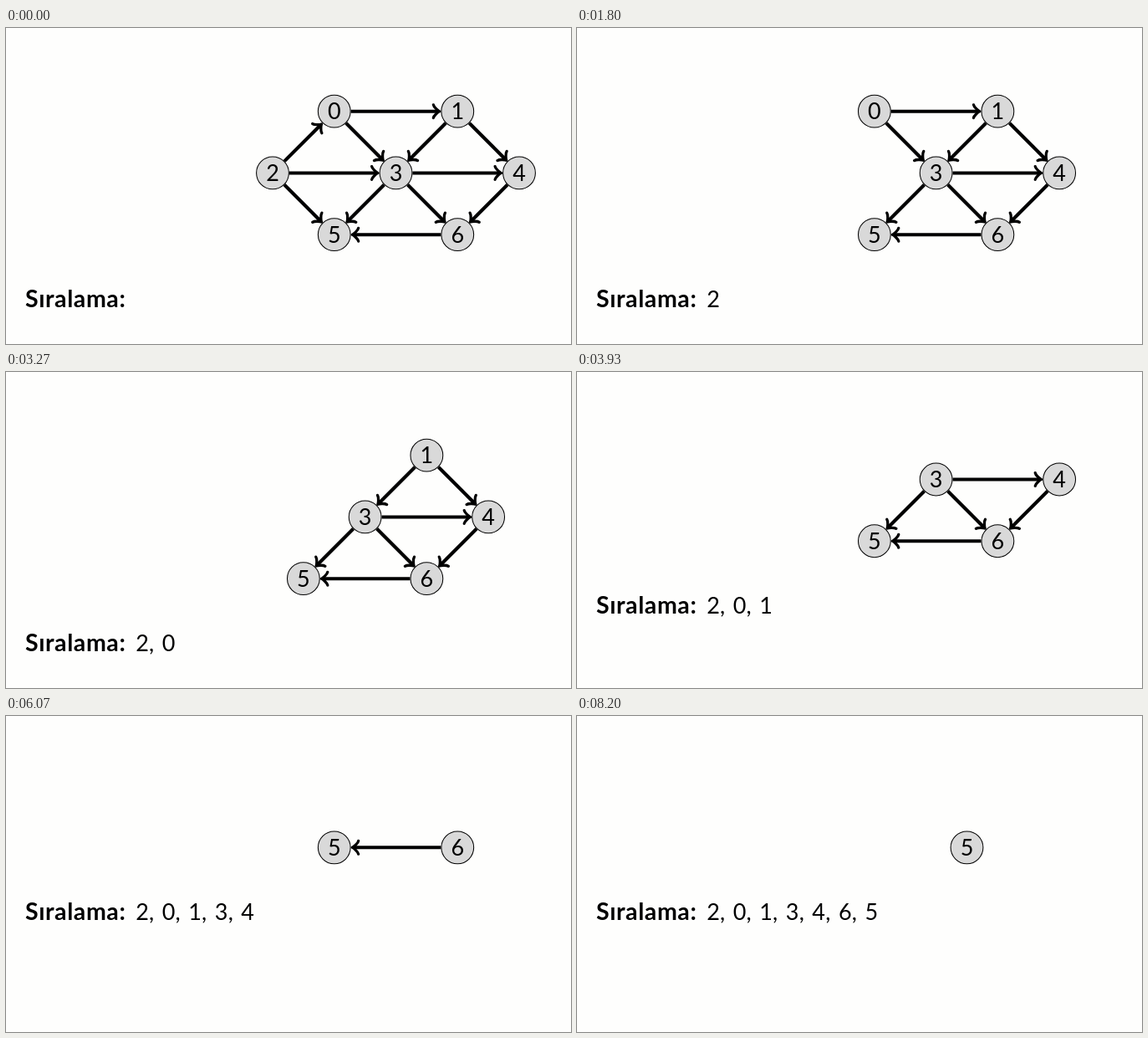
These frames come from a looping animation (676 by 378 pixels, 9760 ms). An HTML page:

```html
<!DOCTYPE html>
<html lang="tr">
<head>
<meta charset="utf-8">
<title>Sıralama</title>
<style>
  html, body { margin: 0; width: 100%; height: 100%; overflow: hidden; background: #fefefd; }
  svg { display: block; width: 676px; height: 378px; }
  text { font: 27px Lato, "Open Sans", sans-serif; fill: #000; }
  .digit { text-anchor: middle; }
  .label { font-weight: 700; font-size: 28.5px; letter-spacing: 0.6px; }
  circle { fill: #d9d9d9; stroke: #000; stroke-width: 1.04; }
  .edge { fill: none; stroke: #000; stroke-width: 4.14; }
  .tip { fill: none; stroke: #000; stroke-width: 3.3; stroke-linecap: round; stroke-linejoin: round; }
</style>
</head>
<body>
<svg viewBox="0 0 676 378"></svg>
<script>
const LOOP = 9760;
const CUTS = [1630, 2730, 3930, 4970, 6070, 6970, 7970];
const UNIT = 73.75;
const RADIUS = 19.4;
const BORDER = 19.9;
const TIP_INSET = 3.1;
const TIP_SIZE = 1.97;

const ROWS = [[0, 1], [2, 3, 4], [5, 6]];
const EDGES = ["01", "03", "13", "14", "20", "23", "25", "34", "35", "36", "46", "65"]
  .map(pair => [...pair].map(Number));

// Rows alternate by one column, so the nodes form diamonds
const NODES = [];
ROWS.forEach((ids, row) => ids.forEach((id, k) => {
  NODES[id] = [2 * k + 1 - row % 2, row];
}));

// Topological order: take the smallest node without incoming edges
function topoSort() {
  const left = new Set(NODES.keys());
  const order = [];
  while (left.size) {
    const next = [...left].find(n => !EDGES.some(([a, b]) => b === n && left.has(a)));
    left.delete(next);
    order.push(next);
  }
  return order;
}
const ORDER = topoSort();

const svg = document.querySelector("svg");

function add(parent, tag, attrs, content = "") {
  const el = document.createElementNS("http://www.w3.org/2000/svg", tag);
  for (const key in attrs) el.setAttribute(key, attrs[key]);
  el.textContent = content;
  return parent.appendChild(el);
}

function tipPath(a) {
  return `M${-3 * a} ${-4 * a}C${-2.75 * a} ${-2.5 * a} 0 ${-0.25 * a} ${0.75 * a} 0` +
         `C0 ${0.25 * a} ${-2.75 * a} ${2.5 * a} ${-3 * a} ${4 * a}`;
}

const graph = add(svg, "g", {});
const caption = add(svg, "g", {});

const edges = EDGES.map(ends => {
  const [[x1, y1], [x2, y2]] = ends.map(i => NODES[i].map(v => v * UNIT));
  const length = Math.hypot(x2 - x1, y2 - y1);
  const angle = Math.atan2(y2 - y1, x2 - x1) * 180 / Math.PI;
  const end = length - BORDER - TIP_INSET;
  const el = add(graph, "g", { transform: `translate(${x1} ${y1}) rotate(${angle})` });
  add(el, "path", { class: "edge", d: `M${BORDER} 0H${end}` });
  add(el, "path", { class: "tip", d: tipPath(TIP_SIZE), transform: `translate(${end} 0)` });
  return { el, ends };
});

const nodes = NODES.map(([col, row], i) => {
  const el = add(graph, "g", { transform: `translate(${col * UNIT} ${row * UNIT})` });
  add(el, "circle", { r: RADIUS });
  add(el, "text", { class: "digit", y: 9.6 }, i);
  return el;
});

add(caption, "text", { class: "label", x: 23 }, "Sıralama:");
const listed = ORDER.map((n, i) => {
  const x = 163 + i * 31.55;
  const el = add(caption, "g", {});
  if (i) add(el, "text", { class: "digit", x: x - 20.5 }, ",");
  add(el, "text", { class: "digit", x }, n);
  return el;
});

function show(el, on) {
  el.setAttribute("visibility", on ? "visible" : "hidden");
}

// The last node stays; the remaining graph and the caption are centred as a block
function render(count) {
  const kept = new Set(ORDER.slice(Math.min(count, ORDER.length - 1)));
  const cols = [...kept].map(i => NODES[i][0]);
  const top = Math.min(...[...kept].map(i => NODES[i][1]));
  const span = ROWS.length - 1 - top;
  const x = 466.5 - (Math.min(...cols) + Math.max(...cols)) / 2 * UNIT;
  const y = 157.3 - span * 28.8 - top * UNIT;
  graph.setAttribute("transform", `translate(${x} ${y})`);
  caption.setAttribute("transform", `translate(0 ${244 + span * 44.9})`);
  nodes.forEach((el, i) => show(el, kept.has(i)));
  edges.forEach(({ el, ends }) => show(el, ends.every(i => kept.has(i))));
  listed.forEach((el, i) => show(el, i < count));
}

const start = performance.now();
let current;

function tick() {
  const t = (performance.now() - start) % LOOP;
  const count = CUTS.filter(cut => cut <= t).length;
  if (count !== current) render(current = count);
  requestAnimationFrame(tick);
}
tick();
</script>
</body>
</html>
```
